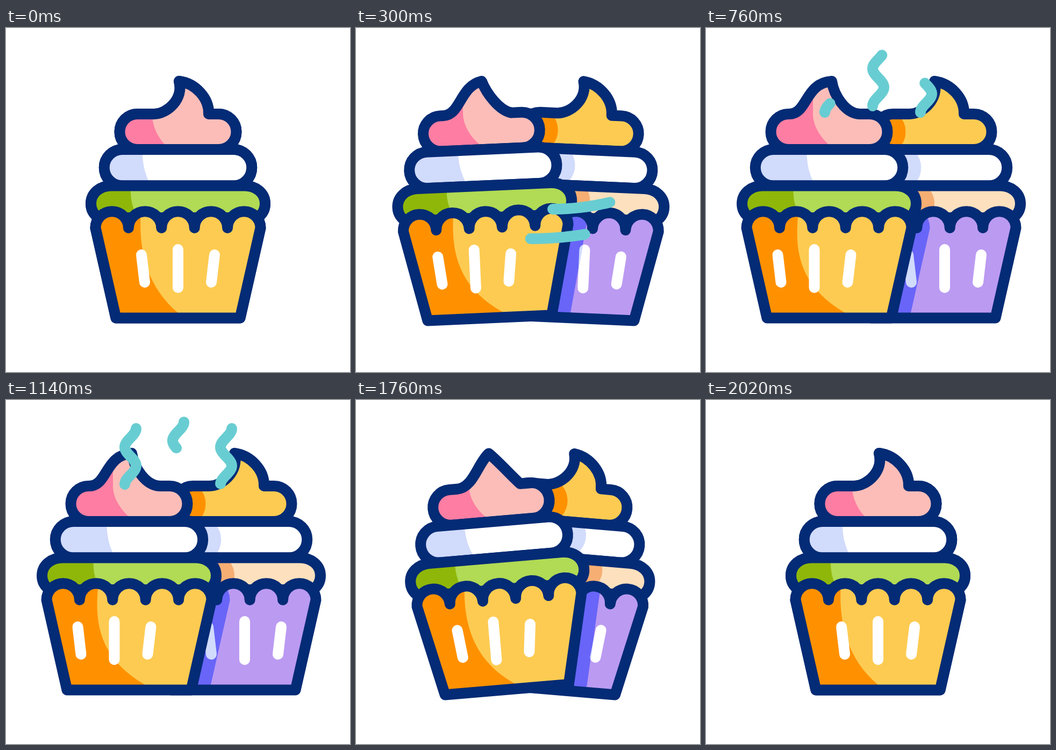
Write an HTML page with a canvas that moves like this. It is 640x640 px and loops after 2.4 s.

```html
<!DOCTYPE html>
<html lang="en">
<head>
<meta charset="utf-8">
<title>Cupcakes</title>
<style>
  html, body { margin: 0; width: 100%; height: 100%; overflow: hidden; background: #fff; }
  canvas { display: block; width: 640px; height: 640px; }
</style>
</head>
<body>
<canvas id="stage" width="640" height="640"></canvas>
<script>
const ctx = document.getElementById('stage').getContext('2d');
const LOOP = 2400, MID = 320, SHADOW = 24;
const NAVY = '#042b75', TEAL = '#68cdd2', WHITE = '#ffffff', LAVENDER = '#d1dbfc';

const clamp = v => Math.max(0, Math.min(1, v));
const lerp = (a, b, k) => a + (b - a) * k;
const smooth = v => v * v * (3 - 2 * v);
const ramp = (time, start, length) => smooth(clamp((time - start) / length));

// Curve parameter of cubic-bezier(.42, 0, .7, 1) at progress u
function bezierParam(u) {
  let lo = 0, hi = 1;
  for (let i = 0; i < 24; i++) {
    const t = (lo + hi) / 2, r = 1 - t;
    if (3 * r * r * t * 0.42 + 3 * r * t * t * 0.7 + t * t * t < u) lo = t; else hi = t;
  }
  return (lo + hi) / 2;
}

// How far the pair is apart (0..1) and its lean in radians
function spread(time) {
  const closing = time > 1541;
  const u = closing ? (time - 1541) / 483 : time / 369;
  if (u <= 0 || u >= 1) return { open: closing ? 0 : +(u >= 1), lean: 0 };
  const t = bezierParam(u);
  return {
    open: closing ? 1 - smooth(t) : smooth(t),
    lean: 5.15 * Math.PI / 180 * Math.sin(Math.PI * t) ** 1.4
  };
}

// Outlines
const pill = new Path2D('M216.5 226 H423.5 A33.5 33.5 0 0 1 423.5 293.5 H216.5 A33.5 33.5 0 0 1 216.5 226 Z');
const base = new Path2D('M196 293.5 H444 C465 293.5 482 307 482 327 C482 340 475 348 468 353 ' +
  'H172 C165 348 158 340 158 327 C158 307 175 293.5 196 293.5 Z');
const wrapper = new Path2D('M166.5 372 ' + 'a30.7 30.7 0 0 1 61.4 0 '.repeat(5) + 'L435.5 539.5 H204.5 Z');
const wrapperEdge = new Path2D('M156 330 H484 V372 L444 550 H196 L156 372 Z');

// k = 0 curls to the left, k = 1 leans the other way
function swirl(k) {
  const m = (a, b) => lerp(a, b, k);
  return new Path2D(`M244.5 226 A33 33 0 0 1 244.5 160 H${m(275, 246)}
    C${m(300, 280)} 160 ${m(331, 275)} ${m(132, 102)} ${m(322, 325)} 99
    C${m(352, 329)} ${m(103, 125)} ${m(378, 350)} ${m(130, 159)} 377 160
    H395.5 A33 33 0 0 1 395.5 226 Z`);
}

const outlines = k => [swirl(k), pill, base, wrapper];

const frontColors = [['#fcbdb8', '#fe7da2'], [WHITE, LAVENDER], ['#b1da55', '#8fb709'], ['#fdcb52', '#ff9100']];
const backColors = [['#fdcb52', '#ff9100'], [WHITE, LAVENDER], ['#fde0bd', '#f6ae73'], ['#bb9af2', '#6865f8']];

// Left-hand shading of the front cupcake
function frontShades(k) {
  const m = (a, b) => lerp(a, b, k);
  const slide = (x, d) => x + d * k;
  return [
    `M190 90 H${slide(272, 18)} V160 C${slide(272, 18)} 182 ${slide(282, 22)} 204 ${slide(299, 24)} 220 V230 H190 Z`,
    `M170 220 H${slide(254, 24.5)} V236 q1 28 12 50 V296 H170 Z`,
    `M140 290 H${slide(232, 21.5)} V304 q0 17 6 34 V360 H140 Z`,
    `M150 340 H${m(251, 263)} C${m(247, 257)} 400 255 475 ${m(320, 350)} 530 V545 H150 Z`
  ].map(d => new Path2D(d));
}

function place(dx, angle) {
  ctx.setTransform(1, 0, 0, 1, MID + dx, MID);
  ctx.rotate(angle);
  ctx.translate(-MID, -MID);
}

function line(points, color) {
  ctx.beginPath();
  points.forEach(([x, y]) => ctx.lineTo(x, y));
  ctx.strokeStyle = color;
  ctx.stroke();
}

function slots(dx, color) {
  for (const side of [-1, 0, 1]) {
    const x = MID + dx + side * 65, tilt = side * 3, reach = side ? 25.5 : 35.5;
    line([[x + tilt, 447.5 - reach], [x - tilt, 447.5 + reach]], color);
  }
}

function outline(path) {
  ctx.strokeStyle = NAVY;
  ctx.stroke(path);
}

function drawFront(turn, pose) {
  place(...pose);
  const shades = frontShades(turn);
  outlines(turn).forEach((path, i) => {
    const [light, dark] = frontColors[i];
    ctx.fillStyle = light;
    ctx.fill(path);
    ctx.save();
    ctx.clip(path);
    ctx.fillStyle = dark;
    ctx.fill(shades[i]);
    ctx.restore();
    outline(path);
  });
  slots(-27.5 * turn, WHITE);
}

// The front cupcake drops its shadow on the back one
function drawBack(turn, pose, [frontX, frontLean]) {
  const casters = outlines(turn);
  const slotShift = 21 * turn;
  outlines(0).forEach((path, i) => {
    const [light, dark] = backColors[i];
    place(...pose);
    ctx.fillStyle = light;
    ctx.fill(path);
    if (path === wrapper) slots(slotShift, WHITE);

    ctx.save();
    ctx.clip(path);
    place(frontX + SHADOW, frontLean);
    ctx.fillStyle = ctx.strokeStyle = dark;
    ctx.fill(casters[i]);
    ctx.stroke(casters[i]);
    if (path === wrapper) {
      ctx.clip(wrapperEdge);
      place(...pose);
      slots(slotShift, LAVENDER);
    }
    ctx.restore();

    place(...pose);
    outline(path);
  });
}

// Part of a curve between two fractions
function trimmed(from, to, at) {
  if (to - from < 0.002) return;
  const steps = 40;
  line(Array.from({ length: steps + 1 }, (_, i) => at(lerp(from, to, i / steps))), TEAL);
}

const steams = [
  { x: 320.5, y: 145, grow: 452, fade: 942 },
  { x: 409.5, y: 157, grow: 565, fade: 1117 },
  { x: 231.5, y: 157, grow: 665, fade: 1292 }
];
const streaks = [
  { x: 300, span: 240, low: 365, y: 337, bend: 0.0011 },
  { x: 262, span: 228, low: 325, y: 392, bend: 0.0008 }
];

function draw(time) {
  ctx.setTransform(1, 0, 0, 1, 0, 0);
  ctx.fillStyle = WHITE;
  ctx.fillRect(0, 0, 640, 640);
  ctx.lineWidth = 20;
  ctx.lineCap = ctx.lineJoin = 'round';

  const { open, lean } = spread(time);
  const turn = open ** 1.4;
  const frontPose = [-91 * open, -lean];
  if (open > 0) drawBack(turn, [103 * open, lean], frontPose);
  drawFront(turn, frontPose);

  ctx.setTransform(1, 0, 0, 1, 0, 0);
  for (const s of streaks) {
    trimmed(ramp(time, 232, 200), ramp(time, 171, 200), f => {
      const x = s.x + s.span * f;
      return [x, s.y - s.bend * (x - s.low) ** 2];
    });
  }
  for (const s of steams) {
    trimmed(ramp(time, s.fade, 380), ramp(time, s.grow, 380),
      f => [s.x - 10.5 * Math.cos(3 * Math.PI * f), s.y - 104 * f]);
  }
}

const start = performance.now();
function tick() {
  draw((performance.now() - start) % LOOP);
  requestAnimationFrame(tick);
}
tick();
</script>
</body>
</html>
```
